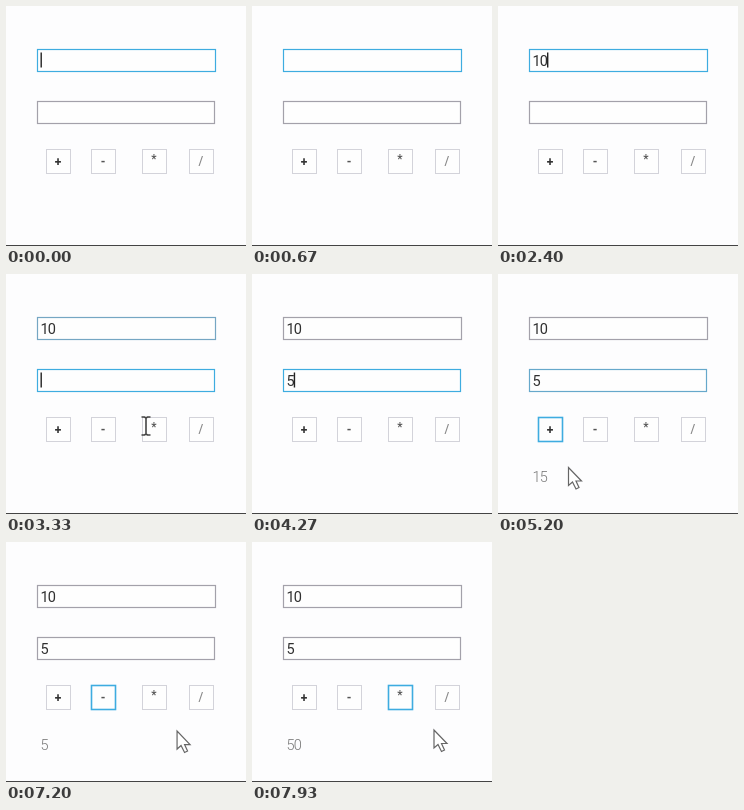
An HTML page with a canvas that plays this animation: 240 by 240 pixels, repeating every 8000 ms.

```html
<!DOCTYPE html>
<html lang="en">
<head>
<meta charset="utf-8">
<title>Calculator</title>
<style>
  html, body { margin: 0; width: 100%; height: 100%; overflow: hidden; background: #fdfdfe; }
  canvas { display: block; width: 100vw; height: 100vh; }
</style>
</head>
<body>
<canvas></canvas>
<script>
const LOOP = 8000;
const SIZE = 240;
const BLINK = 530;
const FADE = 130;
const FONT = 'Roboto, "Open Sans", sans-serif';

const canvas = document.querySelector('canvas');
const ctx = canvas.getContext('2d');
const ratio = window.devicePixelRatio || 1;
canvas.width = Math.round(innerWidth * ratio);
canvas.height = Math.round(innerHeight * ratio);

const IDLE_FIELD = [163, 161, 170];
const IDLE_BUTTON = [211, 211, 218];
const FOCUS = [62, 172, 224];

const controls = [
  { id: 'first', x: 31, y: 43, w: 179, h: 23, idle: IDLE_FIELD },
  { id: 'second', x: 31, y: 95, w: 178, h: 23, idle: IDLE_FIELD },
  { id: '+', x: 40, y: 143, w: 25, h: 25, idle: IDLE_BUTTON, ty: 156, ink: '#333', weight: 700 },
  { id: '-', x: 85, y: 143, w: 25, h: 25, idle: IDLE_BUTTON, ty: 156, ink: '#555', weight: 700 },
  { id: '*', x: 136, y: 143, w: 25, h: 25, idle: IDLE_BUTTON, ty: 153, ink: '#555', weight: 500 },
  { id: '/', x: 183, y: 143, w: 25, h: 25, idle: IDLE_BUTTON, ty: 155.5, ink: '#888', weight: 500 }
];

// Each list holds [start time, value]; the last entry already reached applies.
const focusSteps = [[-1000, 'first'], [3260, 'second'], [5150, '+'], [6380, '-'], [7400, '*']];
const firstText = [[0, ''], [1930, '1'], [2130, '10']];
const secondText = [[0, ''], [4000, '5']];
const resultText = [[0, ''], [5190, '15'], [6600, '5'], [7470, '50']];
const pressed = [[0, ''], [5150, '+'], [5190, ''], [6380, '-'], [6600, ''], [7400, '*'], [7470, '']];
const pointerShape = [
  [0, ''], [870, 'beam'], [1930, ''], [2670, 'beam'], [4000, ''], [4470, 'beam'], [4600, 'arrow']
];
const pointerPath = [
  [870, 238, 98], [1270, 201, 82], [2670, 201, 82], [3130, 140, 152],
  [4470, 140, 152], [4930, 70.5, 193.5], [5870, 70.5, 193.5], [6330, 125, 193.5],
  [6870, 125, 193.5], [7330, 182, 188]
];

const stepAt = (steps, t) => steps.findLast(([start]) => start <= t);
const valueAt = (steps, t) => stepAt(steps, t)[1];
const mix = (a, b, k) => `rgb(${a.map((v, i) => Math.round(v + (b[i] - v) * k))})`;

function pointerAt(t) {
  const next = pointerPath.findIndex(p => p[0] > t);
  if (next <= 0) return pointerPath.at(next).slice(1);
  const [t0, x0, y0] = pointerPath[next - 1];
  const [t1, x1, y1] = pointerPath[next];
  const p = (t - t0) / (t1 - t0);
  const k = p * p * (3 - 2 * p);
  return [x0 + (x1 - x0) * k, y0 + (y1 - y0) * k];
}

function setFont(size, weight, color, spacing) {
  ctx.font = `${weight} ${size}px ${FONT}`;
  ctx.letterSpacing = spacing;
  ctx.fillStyle = color;
}

function drawNumber(value, y, weight, color) {
  setFont(14.5, weight, color, '-0.9px');
  ctx.textAlign = 'left';
  ctx.textBaseline = 'alphabetic';
  ctx.fillText(value, 34.5, y);
}

// Focus arrives at once and fades when it leaves.
function focusAmount(id, t) {
  const index = focusSteps.indexOf(stepAt(focusSteps, t));
  const [start, focused] = focusSteps[index];
  if (focused === id) return 1;
  const previous = index > 0 && focusSteps[index - 1][1];
  return previous === id ? Math.max(0, 1 - (t - start) / FADE) : 0;
}

function drawControl(c, t) {
  const isPressed = valueAt(pressed, t) === c.id;
  const focus = focusAmount(c.id, t);
  ctx.fillStyle = isPressed ? '#e2f6fa' : '#fefefe';
  ctx.fillRect(c.x, c.y, c.w, c.h);
  ctx.strokeStyle = isPressed ? '#2a8fbd' : mix(c.idle, FOCUS, focus);
  ctx.lineWidth = c.ink ? 1 + focus * 0.6 : 1.2;
  ctx.strokeRect(c.x + 0.5, c.y + 0.5, c.w - 1, c.h - 1);
  if (c.ink) {
    setFont(12, c.weight, c.ink, '0px');
    ctx.textAlign = 'center';
    ctx.textBaseline = 'middle';
    ctx.fillText(c.id, c.x + c.w / 2 - 0.5, c.ty);
  }
}

function drawField(c, steps, t) {
  const [changed, value] = stepAt(steps, t);
  drawNumber(value, c.y + 16.5, 400, '#303030');
  const [focused, id] = stepAt(focusSteps, t);
  const since = t - Math.max(changed, focused);
  if (id === c.id && Math.floor(since / BLINK) % 2 === 0) {
    ctx.fillStyle = '#222';
    ctx.fillRect(34.5 + ctx.measureText(value).width, c.y + 3.5, 1.4, 15);
  }
}

function drawPointer(t) {
  const shape = valueAt(pointerShape, t);
  if (!shape) return;
  ctx.save();
  ctx.translate(...pointerAt(t));
  if (shape === 'beam') {
    ctx.strokeStyle = '#444';
    ctx.lineWidth = 1.6;
    ctx.stroke(new Path2D('M-4.5-9H-1.5L0-8 1.5-9H4.5M0-8V8M-4.5 9H-1.5L0 8 1.5 9H4.5'));
  } else {
    const arrow = new Path2D('M0 0V18L4 14.5 7.5 21.5 10.5 20 7.5 13.5H13Z');
    ctx.strokeStyle = '#666';
    ctx.fillStyle = '#fff';
    ctx.lineWidth = 1.2;
    ctx.fill(arrow);
    ctx.stroke(arrow);
  }
  ctx.restore();
}

function draw(t) {
  ctx.setTransform(canvas.width / SIZE, 0, 0, canvas.height / SIZE, 0, 0);
  ctx.fillStyle = '#fdfdfe';
  ctx.fillRect(0, 0, SIZE, SIZE);
  controls.forEach(c => drawControl(c, t));
  drawField(controls[0], firstText, t);
  drawField(controls[1], secondText, t);
  drawNumber(valueAt(resultText, t), 208, 300, '#777');
  ctx.fillStyle = '#444';
  ctx.fillRect(0, 239, SIZE, 1);
  drawPointer(t);
}

const startTime = performance.now();
function frame() {
  draw((performance.now() - startTime) % LOOP);
  requestAnimationFrame(frame);
}
frame();
</script>
</body>
</html>
```
